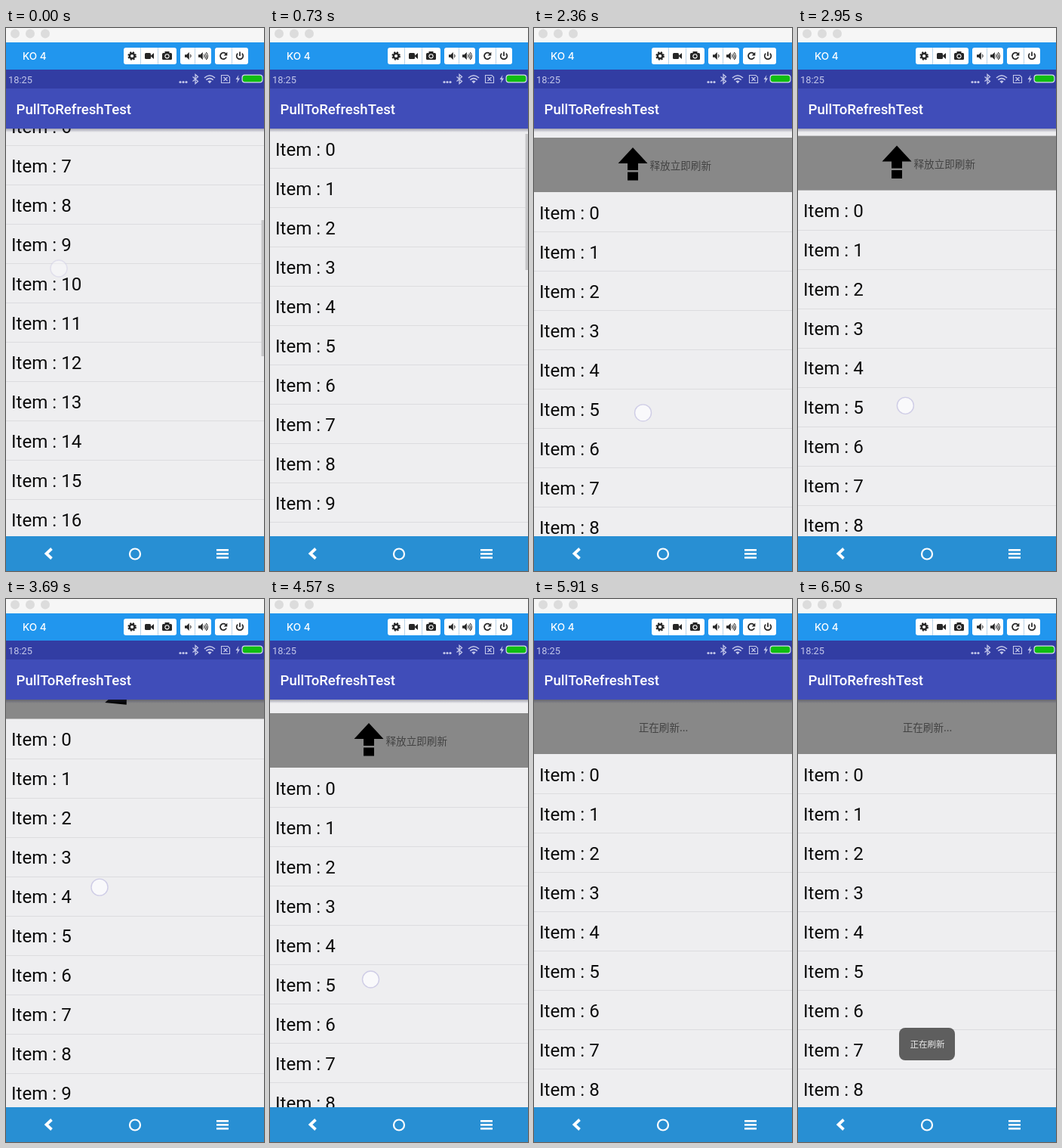
Write an HTML page with a canvas that moves like this. It is 342 px wide and 718 px high and loops after 8000 ms.

```html
<!DOCTYPE html>
<html lang="zh">
<head>
<meta charset="utf-8">
<style>
html, body { margin: 0; width: 342px; height: 718px; overflow: hidden; background: #eeeef0; }
canvas { display: block; }
</style>
</head>
<body>
<canvas id="stage" width="342" height="718"></canvas>
<script>
const c = document.getElementById('stage').getContext('2d');
const LOOP = 8000, STEP = 147.6, LAST = 44, TURN = 100;
const TOP = 133, BOTTOM = 672, ROW = 52, HEADER = 72;
const OPEN = 232; // first row centre with the header fully shown
const PRESS_AT = 6, LIFT_AT = 38, REFRESH_AT = 40;
const CJK = '"Noto Sans CJK SC", "Noto Sans CJK JP", "Noto Sans CJK", sans-serif';
const ROBOTO = 'Roboto, sans-serif';

// turning points of the drag: step, first row centre, touch x
const drag = [
  [0, -182, 70], [5, 160, 122], [10, 240, 142.5], [16, 244, 144.5],
  [24.4, 239, 140], [25, 185.5, 124], [27, 180, 124], [31, 250, 133.5],
  [36.6, 212, 140], [37, 247, 145], [38, 250, 146], [REFRESH_AT, OPEN, 146], [LAST, OPEN, 146]
];

const clamp = (v, lo = 0, hi = 1) => Math.max(lo, Math.min(hi, v));

// The arrow makes half a turn each time the list passes the OPEN line.
function pose(k) {
  let angle = 180, row, x;
  for (let i = 1; i < drag.length && drag[i - 1][0] <= k; i++) {
    const [k0, y0, x0] = drag[i - 1], [k1, y1, x1] = drag[i];
    const u = clamp((k - k0) / (k1 - k0));
    row = y0 + (y1 - y0) * u;
    x = x0 + (x1 - x0) * u;
    if ((y0 > OPEN) !== (y1 > OPEN)) {
      const cross = k0 + (k1 - k0) * (OPEN - y0) / (y1 - y0);
      angle += 180 * clamp((k - cross) * STEP / TURN);
    }
  }
  return { angle, row, x };
}

function rect(x, y, w, h, color) {
  c.fillStyle = color;
  c.fillRect(x, y, w, h);
}

function round(x, y, w, h, r, color) {
  c.fillStyle = color;
  c.beginPath();
  c.roundRect(x, y, w, h, r);
  c.fill();
}

function disc(x, y, r, color) {
  c.fillStyle = color;
  c.beginPath();
  c.arc(x, y, r, 0, 7);
  c.fill();
}

function text(s, x, y, font, color, align = 'left', base = 'alphabetic') {
  c.font = font;
  c.fillStyle = color;
  c.textAlign = align;
  c.textBaseline = base;
  c.fillText(s, x, y);
}

function line(d, color, width) {
  c.strokeStyle = color;
  c.lineWidth = width;
  c.stroke(new Path2D(d));
}

function fill(d, color) {
  c.fillStyle = color;
  c.fill(new Path2D(d));
}

function toolbar() {
  rect(0, 0, 342, 19, '#f6f6f6');
  for (const x of [12, 32, 52]) disc(x, 7.5, 6, '#dcdcdc');
  rect(0, 19, 342, 36, '#2196ee');
  text('KO 4', 22, 42, '500 13.5px Inter, "Liberation Sans", sans-serif', '#fff');

  for (const [x, w] of [[156, 70], [231, 41], [277, 44]]) round(x, 26, w, 22, 3, '#fff');
  for (const x of [178, 201, 250, 299]) rect(x, 26, 1, 22, '#b9d3e8');

  const ink = '#262626';
  c.setLineDash([2.1, 1.8]);
  line('M172 37a4.9 4.9 0 1 1-9.8 0a4.9 4.9 0 1 1 9.8 0', ink, 1.8);
  c.setLineDash([]);
  line('M170.4 37a3.3 3.3 0 1 1-6.6 0a3.3 3.3 0 1 1 6.6 0', ink, 2.4);
  round(184, 33, 8, 8, 1.5, ink);
  fill('M192 36.5L196 33V41L192 37.5Z', ink);
  round(207, 33, 13, 9, 1.5, ink);
  rect(210.5, 31, 6, 3, ink);
  disc(213.5, 37.3, 3.1, '#fff');
  disc(213.5, 37.3, 2, ink);
  for (const x of [237, 255]) {
    c.save();
    c.translate(x, 0);
    fill('M0 35.3h2.5L5.8 32v10L2.5 38.7H0Z', ink);
    line('M7.2 35.2q1.8 1.8 0 3.6', ink, 1.1);
    if (x > 250) line('M8.8 33.5q3.2 3.5 0 7M10.3 32q4.4 5 0 10', ink, 1.1);
    c.restore();
  }
  line('M291.5 34.2A4.2 4.2 0 1 0 292.1 38.5', ink, 1.8);
  fill('M293.3 31.7V36.4H288.6Z', ink);
  line('M307.2 33.6A4.3 4.3 0 1 0 312.8 33.6M310 31.5V37', ink, 1.7);
}

function statusBar() {
  const tint = '#c4c8ea';
  rect(0, 55, 342, 25, '#323da3');
  text('18:25', 3, 72.5, '12.8px ' + ROBOTO, tint);
  for (const x of [231, 235, 239]) disc(x, 71.5, 1.6, tint);
  line('M247.5 64.5L254.5 70.5L251 73.5V61.5L254.5 64.5L247.5 70.5', tint, 1.3);
  line('M263 66q7-6.5 14 0M265.3 68.7q4.7-4.2 9.4 0', tint, 1.6);
  fill('M267.4 70.4q2.6-2 5.2 0L270 73.3Z', tint);
  line('M285.5 62.5H294L296.5 65V72.5H285.5ZM288.5 65l5 5M293.5 65l-5 5', tint, 1.1);
  fill('M308.5 62L304.5 68H307L305.8 73L310 66.5H307.4Z', tint);
  round(312.5, 61.5, 28, 11, 4, '#d5d9ee');
  round(313.7, 62.7, 25.6, 8.6, 3, '#10bd12');
}

function appBar() {
  rect(0, 80, 342, 53, '#404db9');
  const shade = c.createLinearGradient(0, TOP, 0, TOP + 5);
  shade.addColorStop(0, 'rgba(50,50,80,.4)');
  shade.addColorStop(1, 'rgba(50,50,80,0)');
  rect(0, TOP, 342, 5, shade);
  text('PullToRefreshTest', 13.5, 113.7, '500 18.6px ' + ROBOTO, '#fff');
}

function navBar() {
  rect(0, BOTTOM, 342, 46, '#288fd3');
  line('M60.5 688.5L53.5 695L60.5 701.5', '#fff', 3.8);
  line('M178 695.5a7 7 0 1 1-14 0a7 7 0 1 1 14 0', '#fff', 2.2);
  for (const y of [689, 694, 699]) rect(279, y, 16, 2.6, '#fff');
}

function header(row, k, angle) {
  const top = row - 99, mid = top + HEADER / 2;
  const label = (s, x, align) => text(s, x, mid + 1, '13.6px ' + CJK, '#434343', align, 'middle');
  rect(0, top, 342, HEADER, '#888');
  if (k >= REFRESH_AT) return label('正在刷新...', 171.5, 'center');

  const release = row > OPEN, shift = release ? 0 : 13.5;
  label(release ? '释放立即刷新' : '下拉刷新', 153.5 + shift, 'left');
  c.save();
  c.translate(131 + shift, mid);
  c.rotate(angle * Math.PI / 180);
  fill('M0-23L19.5-2H7V7H-7V-2H-19.5ZM-7 9.5H7V20.5H-7Z', '#000');
  c.restore();
}

function list(row, k) {
  for (let i = 0; i < 31; i++) {
    const y = row + i * ROW;
    text('Item : ' + i, 7, y + 8.5, '24.1px ' + ROBOTO, '#0c0c0c');
    rect(0, Math.round(y + 25), 342, 1, '#dcdcdf');
  }
  c.globalAlpha = clamp((8 - k) / 3);
  rect(338.5, 254 - (Math.min(row, 160) + 182) / 3, 3.5, 180, '#c6c6c8');
  c.globalAlpha = 1;
}

function touch(row, k, x) {
  if (k > LIFT_AT || k > 0 && k < PRESS_AT) return;
  // The list follows at half the finger's speed.
  const y = k ? 2 * row + 3 + 1.19 * Math.abs(31 - k) : 318;
  c.globalAlpha = k ? 1 : .5;
  disc(x, y, 11, 'rgba(250,250,252,.9)');
  c.strokeStyle = '#cfcde6';
  c.lineWidth = 1.4;
  c.stroke();
  c.globalAlpha = 1;
}

function toast(alpha) {
  c.globalAlpha = alpha;
  round(134, 567, 74, 43, 8, '#5e5e5e');
  text('正在刷新', 171.5, 589, '11.5px ' + CJK, '#e8e8e8', 'center', 'middle');
  c.globalAlpha = 1;
}

function draw(now) {
  const k = Math.min(LAST, Math.floor((now % LOOP + 12) / STEP));
  const { angle, row, x } = pose(k);
  rect(0, 0, 342, 718, '#eeeef0');
  c.save();
  c.beginPath();
  c.rect(0, TOP, 342, BOTTOM - TOP);
  c.clip();
  list(row, k);
  header(row, k, angle);
  touch(row, k, x);
  toast(clamp((k - REFRESH_AT) / 3));
  c.restore();
  toolbar();
  statusBar();
  appBar();
  navBar();
}

const start = performance.now();
function tick() {
  draw(performance.now() - start);
  requestAnimationFrame(tick);
}
tick();
</script>
</body>
</html>
```
